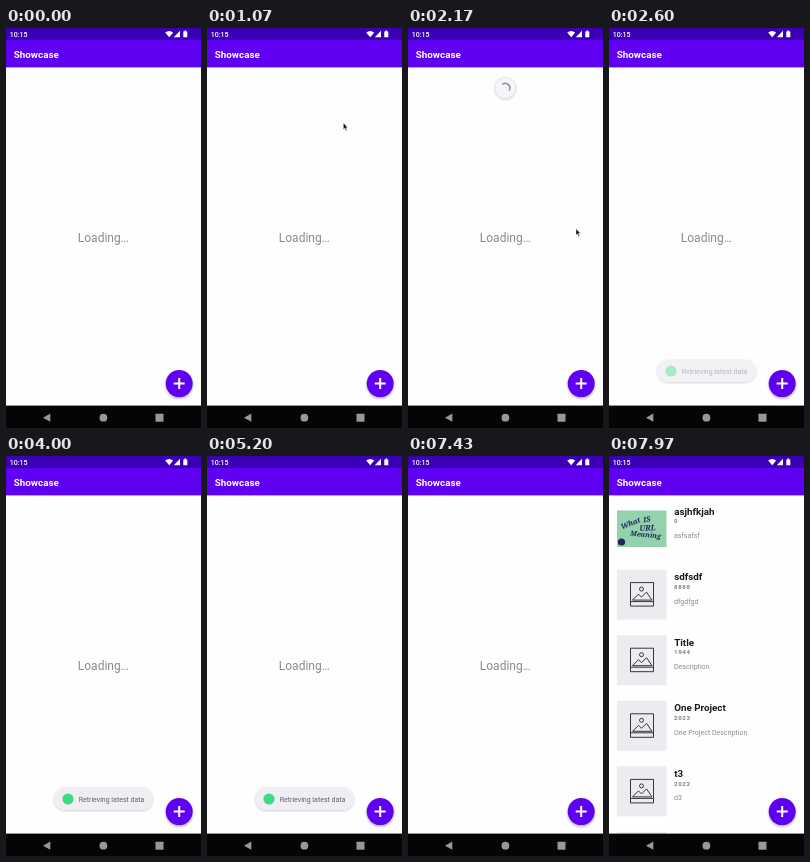
An HTML page for the animation above (8 s loop, 195 by 400 pixels).

```html
<!DOCTYPE html>
<html lang="en">
<head>
<meta charset="utf-8">
<title>Showcase</title>
<style>
html, body { margin: 0; width: 100%; height: 100%; overflow: hidden; background: #fefefe; }
svg { display: block; width: 195px; height: 400px; }
text { font-family: Roboto, sans-serif; white-space: pre; }
.title { font-size: 9.8px; font-weight: 700; fill: #1a1a1a; }
.year { font-size: 6.2px; font-weight: 700; letter-spacing: .6px; fill: #808080; }
.body { font-size: 7px; fill: #8c8c8c; }
.art { font-family: "Noto Serif", serif; font-weight: 700; font-style: italic; fill: #20235c; }
</style>
</head>
<body>
<svg viewBox="0 0 195 400">
  <defs>
    <filter id="soft" x="-30%" y="-30%" width="160%" height="180%">
      <feDropShadow dx="0" dy="1.4" stdDeviation="1.2" flood-color="#223" flood-opacity=".35"/>
    </filter>
    <filter id="faint" x="-30%" y="-30%" width="160%" height="180%">
      <feDropShadow dx="0" dy=".6" stdDeviation=".8" flood-color="#334" flood-opacity=".3"/>
    </filter>
    <g id="placeholder" fill="none" stroke="#34343a" stroke-linejoin="round">
      <rect x="8" y="0" width="49.5" height="50" fill="#ececf0" stroke="none"/>
      <rect x="21.5" y="13" width="23" height="23.5"/>
      <path d="M21.5 32H44.5M23.5 30.5L29.5 24.5L32.5 27.5L37.5 22.5L43 30.5Z"/>
      <circle cx="32.5" cy="19.5" r="2"/>
    </g>
  </defs>

  <rect width="195" height="400" fill="#fefefe"/>
  <text id="loading" x="71.8" y="213.5" font-size="12" fill="#8a8a8a">Loading…</text>
  <g id="list"></g>

  <g id="spinner">
    <circle r="10.3" fill="#f6f5fc" stroke="#e2e0ee" stroke-width=".6" filter="url(#faint)"/>
    <path id="arc" fill="none" stroke="#858592" stroke-width="1.4"/>
  </g>

  <rect width="195" height="39.4" fill="#6000f2"/>
  <rect width="195" height="12" fill="#3b00b5"/>
  <text x="3.8" y="8.7" font-size="7" font-weight="500" fill="#fff">10:15</text>
  <g fill="#fff">
    <path d="M159.2 4.6Q163.2 1.4 167.2 4.6L163.2 9.3Z"/>
    <path d="M174 2.8V9.2H167.8Z"/>
    <path d="M177.3 3.4H178.5V2.6H180.1V3.4H181.3V9.3H177.3Z"/>
  </g>
  <text x="7.8" y="29.8" font-size="9.8" font-weight="700" fill="#fff">Showcase</text>

  <g id="toast">
    <rect id="pill" x="48.3" y="332" width="98.4" height="22" rx="11" fill="#eeeef4" filter="url(#faint)"/>
    <g id="message">
      <circle cx="62" cy="343" r="5.6" fill="#3ddc84"/>
      <text x="72.7" y="345.5" font-size="7" fill="#606066">Retrieving latest data</text>
    </g>
  </g>

  <circle cx="173.2" cy="355.6" r="13.5" fill="#6000f2" filter="url(#soft)"/>
  <path d="M167.7 355.6H178.7M173.2 350.1V361.1" stroke="#fff" stroke-width="2"/>

  <rect y="377.6" width="195" height="23" fill="#050505"/>
  <g fill="#989898">
    <path d="M37 389.7L44.3 385.6V393.8Z"/>
    <circle cx="97.4" cy="389.7" r="3.9"/>
    <rect x="149.5" y="385.7" width="8" height="8" rx=".6"/>
  </g>

  <path id="cursor" d="M0 0V6.6L1.5 5.3L2.6 7.8L3.7 7.3L2.6 4.9H4.6Z" fill="#111" stroke="#fff" stroke-width=".5"/>
</svg>
<script>
const $ = id => document.getElementById(id);
const LOOP = 8000, TOP = 48, PITCH = 65.6;

// The last row only peeks out above the navigation bar.
const items = [
  ["asjhfkjah", "0", "asfsafsf"],
  ["sdfsdf", "8888", "dfgdfgd"],
  ["Title", "1944", "Description"],
  ["One Project", "2023", "One Project Description"],
  ["t3", "2022", "d3"],
  ["", "", ""]
];

const banner = `
  <rect x="8" y="6.5" width="49.5" height="36.5" fill="#92d2ad"/>
  <text class="art" font-size="7.4" transform="translate(13 25.5) rotate(-22)">What</text>
  <text class="art" font-size="7.4" transform="translate(34.5 18.5) rotate(-8)">IS</text>
  <text class="art" font-size="7.8" transform="translate(30.5 27) rotate(-3)">URL</text>
  <text class="art" font-size="7" transform="translate(21 31.5) rotate(6)">Meaning</text>
  <circle cx="12.5" cy="38" r="3.6" fill="#20235c"/>`;

$("list").innerHTML = items.map(([title, year, body], i) => `
  <g transform="translate(0 ${TOP + i * PITCH})">
    ${i ? '<use href="#placeholder"/>' : banner}
    <text class="title" x="65.2" y="10.7">${title}</text>
    <text class="year" x="65" y="19.2">${year}</text>
    <text class="body" x="65" y="34">${body}</text>
  </g>`).join("");

const clamp = x => Math.max(0, Math.min(1, x));
const span = (t, a, b) => clamp((t - a) / (b - a));
const smooth = x => x * x * (3 - 2 * x);
const mix = (a, b, k) => a + (b - a) * k;

function placeCursor(t) {
  const enter = smooth(span(t, 700, 870));
  const aim = smooth(span(t, 1030, 1370));
  const leave = span(t, 1900, 2250) ** 2;
  const x = mix(mix(mix(169, 137, enter), 120, aim), 200, leave);
  const y = mix(93, 124, aim) + 76 * span(t, 1400, 1830);
  $("cursor").setAttribute("transform", `translate(${x} ${y + .6})`);
  $("cursor").style.display = t >= 700 && t < 2250 ? "" : "none";
}

function placeSpinner(t) {
  const pull = span(t, 1400, 1830);
  const settle = smooth(span(t, 1870, 2070));
  const scale = 1 - span(t, 2370, 2520);
  const y = mix(mix(29, 64.8, pull), 60, settle);
  const turn = t < 1870 ? (t - 1700) * .25 : 42 + (t - 1870) * .6;
  const half = Math.PI / 2 * .9;
  const px = 4.6 * Math.sin(half), py = 4.6 * Math.cos(half);
  $("spinner").setAttribute("transform", `translate(97.3 ${y}) scale(${scale})`);
  $("spinner").style.display = pull > 0 && scale > 0 ? "" : "none";
  $("arc").setAttribute("d", `M${px} ${py}A4.6 4.6 0 0 1 ${-px} ${py}`);
  $("arc").setAttribute("transform", `rotate(${turn})`);
}

function fadeToast(t) {
  const show = span(t, 2500, 2750) * (1 - span(t, 7030, 7280));
  $("pill").style.opacity = show ** .25;
  $("message").style.opacity = show;
}

function draw(t) {
  placeCursor(t);
  placeSpinner(t);
  fadeToast(t);
  const loaded = t >= 7895;
  $("loading").style.display = loaded ? "none" : "";
  $("list").style.opacity = loaded ? mix(.35, 1, span(t, 7895, 7965)) : 0;
}

function tick() {
  draw(performance.now() % LOOP);
  requestAnimationFrame(tick);
}
tick();
</script>
</body>
</html>
```
